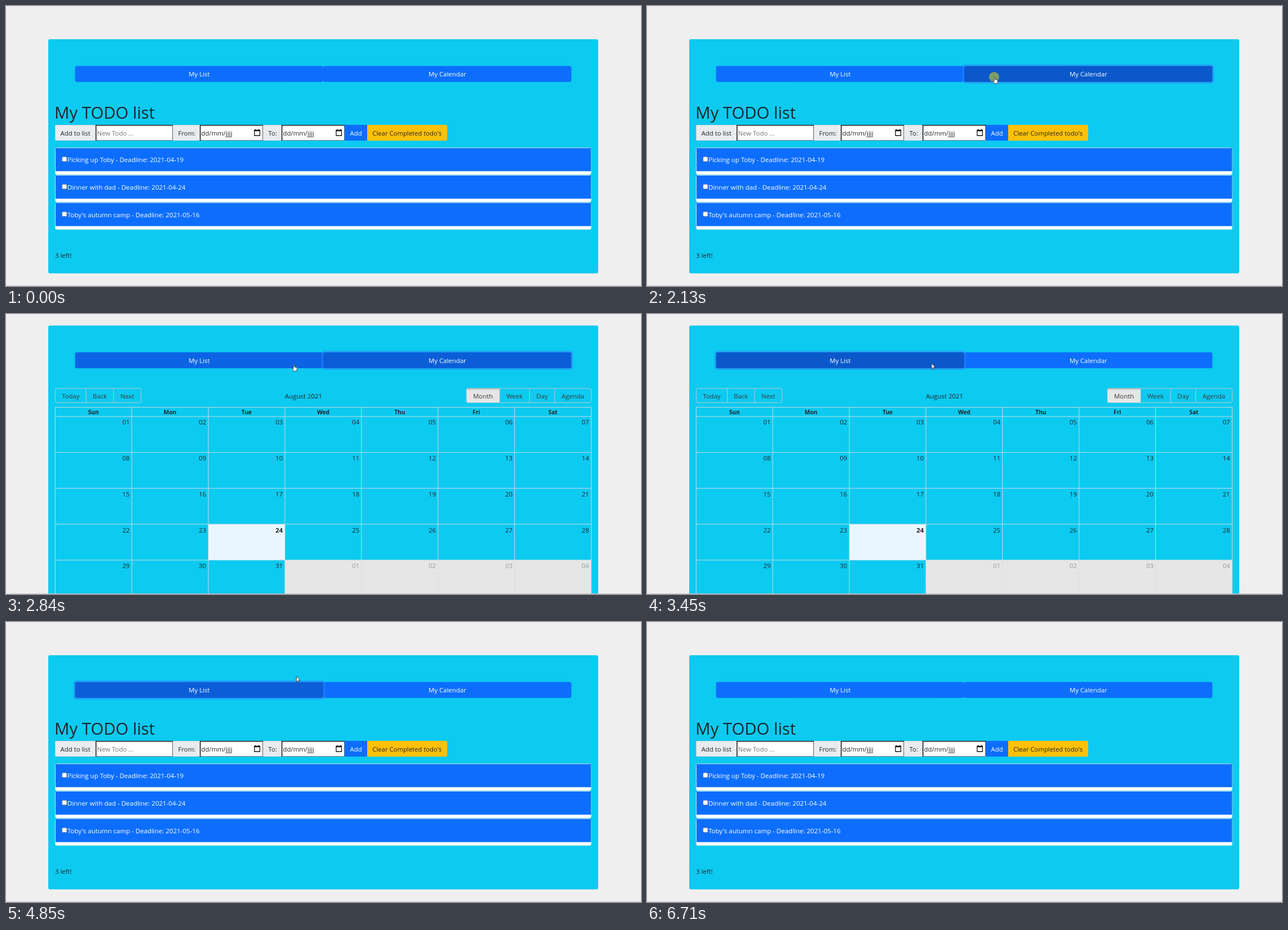
Recreate the animation shown at these times as an HTML page. Size 1127 by 497 pixels, loop 6780 ms.

```html
<!DOCTYPE html>
<html lang="en">
<head>
<meta charset="utf-8">
<title>Todo list and calendar</title>
<style>
  html, body { margin: 0; width: 100%; height: 100%; overflow: hidden; background: #efefef; }
  svg { display: block; width: 100%; height: 100%; }
  text { font-family: "Open Sans", "Noto Sans", sans-serif; white-space: pre; }
</style>
</head>
<body>
<svg id="stage" viewBox="0 0 1127 497"></svg>
<script>
const LOOP = 6780;
const INK = '#212529', BLUE = '#0d6efd', CYAN = '#0dcaf0';
const stage = document.getElementById('stage');

const rect = (x, y, w, h, fill, extra = '') =>
  `<rect x="${x}" y="${y}" width="${w}" height="${h}" fill="${fill}" ${extra}/>`;
const path = (d, stroke, width = 1, fill = 'none') =>
  `<path d="${d}" fill="${fill}" stroke="${stroke}" stroke-width="${width}"/>`;
const text = (x, y, label, { fill = INK, size = 11.4, anchor = 'start', weight = 400 } = {}) =>
  `<text x="${x}" y="${y}" fill="${fill}" font-size="${size}" text-anchor="${anchor}" font-weight="${weight}">${label}</text>`;

const label = (x, w, str) =>
  rect(x + .5, 211.5, w - 1, 27, '#e9ecef', 'stroke="#ced4da" rx="1"') + text(x + 9.5, 230, str);

const field = (x, w, str, fill) =>
  rect(x, 211, w, 28, '#fff') +
  path(`M${x + w - .5} 211V238.5H${x}`, '#767676') +
  path(`M${x + .75} 239V211.75H${x + w}`, '#222', 1.5) +
  text(x + 2.5, 230, str, { fill });

const dateField = x =>
  field(x, 112, 'dd/mm/jjjj', INK) +
  path(`M${x + 97} 220.5h9.5v9.5h-9.5z`, '#111', 1.3) +
  path(`M${x + 96.5} 221.3h10.5M${x + 98.7} 218.8v2M${x + 104.8} 218.8v2`, '#111', 1.8);

function todo(str, i) {
  const y = 251.3 + 48.75 * i;
  return rect(87.4, y + .4, 951.2, 47.6, '#fff', 'rx="3" stroke="#c5dde6" stroke-width=".8"') +
    rect(88, y + .9, 950.4, 41, BLUE) +
    rect(99.6, y + 16.4, 8.3, 8.3, '#fff', `class="check" rx="1.5" stroke="#767676" stroke-width=".8"`) +
    text(109, y + 25.8, str, { fill: '#fff', size: 11.5 });
}

function listView() {
  return rect(75, 59, 976, 415.5, CYAN, 'rx="3"') +
    text(86, 199.5, 'My TODO list', { size: 29.3 }) +
    label(87, 72, 'Add to list') + field(159, 137, 'New Todo ...', '#757575') +
    label(296, 48, 'From:') + dateField(344) +
    label(456, 33, 'To:') + dateField(489) +
    rect(601, 211, 40, 28, BLUE) + text(610.5, 230, 'Add', { fill: '#fff' }) +
    path('M641 211h139q3 0 3 3v22q0 3-3 3h-139z', 'none', 0, '#ffc107') +
    text(650.3, 230, "Clear Completed todo's", { size: 11.3 }) +
    ['Picking up Toby - Deadline: 2021-04-19',
     'Dinner with dad - Deadline: 2021-04-24',
     "Toby's autumn camp - Deadline: 2021-05-16"].map(todo).join('') +
    text(87, 446.8, '3 left!');
}

function toolbar(edges, names) {
  const last = edges.length - 1;
  return rect(edges[0], 132, edges[last] - edges[0], 25.3, 'none', 'rx="3" stroke="#ccc" stroke-width=".9"') +
    names.map((name, i) =>
      (i ? path(`M${edges[i]} 132v25.3`, '#ccc', .9) : '') +
      text((edges[i] + edges[i + 1]) / 2, 149.8, name, { fill: '#373a3c', anchor: 'middle' })).join('');
}

function calendarView() {
  const colX = c => 87.3 + 135.9 * c, rowY = r => 182 + 63.7 * r;
  let out = rect(75, 20.5, 976, 490, CYAN, 'rx="3"') +
    rect(817.3, 132, 58.7, 25.3, '#e6e6e6', 'rx="2"') +
    path('M817.5 133h58.5', '#b5b5b5', 2) +
    toolbar([87.4, 142.4, 190.9, 239.6], ['Today', 'Back', 'Next']) +
    toolbar([817.2, 876, 929.2, 973.8, 1038.6], ['Month', 'Week', 'Day', 'Agenda']) +
    text(528, 149.8, 'August 2021', { anchor: 'middle', fill: INK }) +
    rect(colX(2), rowY(3), 135.9, 63.7, '#eaf6ff') +
    rect(colX(3), rowY(4), 135.9 * 4, 63.7, '#e6e6e6');
  for (let c = 0; c <= 7; c++) out += path(`M${colX(c)} 165.6V500`, '#ddd', .9);
  for (let r = -1; r < 5; r++) out += path(`M87 ${r < 0 ? 165.6 : rowY(r)}H1038.9`, '#ddd', .9);
  'Sun Mon Tue Wed Thu Fri Sat'.split(' ').forEach((day, c) =>
    out += text(colX(c + .5), 178, day, { size: 10.2, weight: 700, anchor: 'middle' }));
  for (let i = 0; i < 35; i++) {
    const day = String(i % 31 + 1).padStart(2, '0');
    out += text(colX(i % 7 + 1) - 3.7, rowY(Math.floor(i / 7)) + 14.4, day,
      { anchor: 'end', fill: i > 30 ? '#999' : INK, weight: i === 23 ? 700 : 400 });
  }
  return out;
}

const tab = (id, x, name) => `<g id="${id}">` +
  rect(x - 3, 103.5, 446.5, 34.2, '#3184fd', 'rx="5" class="ring"') +
  rect(x, 106.5, 440.5, 28.2, BLUE, 'rx="3" class="face"') +
  text(x + 220.3, 125.2, name, { fill: '#fff', anchor: 'middle' }) + '</g>';

stage.innerHTML = rect(0, 0, 1127, 497, '#efefef') +
  `<g id="list">${listView()}</g><g id="calendar">${calendarView()}</g>` +
  `<g id="tabs">${tab('calTab', 563, 'My Calendar')}${tab('listTab', 122.5, 'My List')}</g>` +
  rect(0, 496, 1127, 1, '#c4c4c4') +
  '<g id="cursor"><circle id="halo" r="9" cx="-1" fill="#f0e400" opacity=".5"/>' +
  `<g id="arrow">${path('M0 0V9.6L2.2 7.6 3.8 11.2 5.3 10.5 3.8 7.1H6.6Z', '#222', .8, '#fff')}</g>` +
  `<g id="hand">${path('M-.9 .8Q0-.4 .9 .8V4.4L4.6 5.2Q5.8 5.6 5.6 7L4.7 11.8H-.3L-3.1 7.6Q-3-6.2 -.9 7.6Z'.replace('-3-6.2', '-3 6.2'), '#222', .8, '#fff')}</g></g>`;

const $ = id => document.getElementById(id);
const show = (id, on) => $(id).setAttribute('visibility', on ? 'visible' : 'hidden');

// Pointer moves: start, end, steps, target x, target y
const moves = [
  [270, 440, 3, 641, 166],
  [730, 1370, 9, 617, 126],
  [2510, 2980, 7, 505, 87.5],
  [4850, 5080, 4, 838, 373],
  [5390, 5850, 7, 1047, 500],
];
const ease = p => p < .5 ? 8 * p ** 4 : 1 - 8 * (1 - p) ** 4;

function pointer(t) {
  let x = 930, y = 390;
  for (const [start, end, steps, toX, toY] of moves) {
    if (t < start) break;
    const step = Math.floor((t - start) / (end - start) * (steps - 1)) + 1;
    const p = ease(Math.min(1, step / steps));
    x += (toX - x) * p;
    y += (toY - y) * p;
  }
  return [x, y];
}

// Linear interpolation through [time, value] pairs
function track(t, keys) {
  const i = keys.findIndex(k => k[0] > t);
  if (i < 0) return keys[keys.length - 1][1];
  if (i === 0) return keys[0][1];
  const [t0, v0] = keys[i - 1], [t1, v1] = keys[i];
  return v0 + (v1 - v0) * (t - t0) / (t1 - t0);
}

const shades = {
  calTab: [[1050, 0], [1200, .75], [1977, .75], [2130, 1], [2210, 1], [2360, .75], [3300, .75], [3450, 0]],
  listTab: [[2745, 0], [2900, .75], [3300, .75], [3450, 1], [3540, 1], [3690, .75], [6480, .75], [6710, 0]],
};
const rings = {
  calTab: [[1977, 0], [2130, .5], [3300, .5], [3450, 0]],
  listTab: [[3300, 0], [3450, .5], [6480, .5], [6710, 0]],
};

function draw(now) {
  const t = now % LOOP;
  const within = (a, b) => t >= a && t < b;
  const onCalendar = within(2210, 3540);
  show('list', !onCalendar);
  show('calendar', onCalendar);
  $('tabs').setAttribute('transform', `translate(0 ${onCalendar ? -38.4 : 0})`);

  for (const id in shades) {
    const v = track(t, shades[id]);
    $(id).querySelector('.face').setAttribute('fill', `rgb(${13 - 3 * v},${110 - 22 * v},${253 - 51 * v})`);
    $(id).querySelector('.ring').setAttribute('opacity', track(t, rings[id]));
  }
  const top = $(within(1900, 3300) ? 'calTab' : 'listTab');
  if ($('tabs').lastChild !== top) $('tabs').append(top);

  const [x, y] = pointer(t);
  const visible = within(270, 5850);
  const hand = within(1050, 2210) || within(2745, 3450);
  $('cursor').setAttribute('transform', `translate(${x} ${y})`);
  show('arrow', visible && !hand);
  show('hand', hand);
  show('halo', within(1900, 2210) || within(3300, 3450));
  document.querySelectorAll('.check')[2].setAttribute('stroke', within(5000, 5466) ? '#4f4f4f' : '#767676');
}

const began = performance.now();
function tick() {
  draw(performance.now() - began);
  requestAnimationFrame(tick);
}
tick();
</script>
</body>
</html>
```
